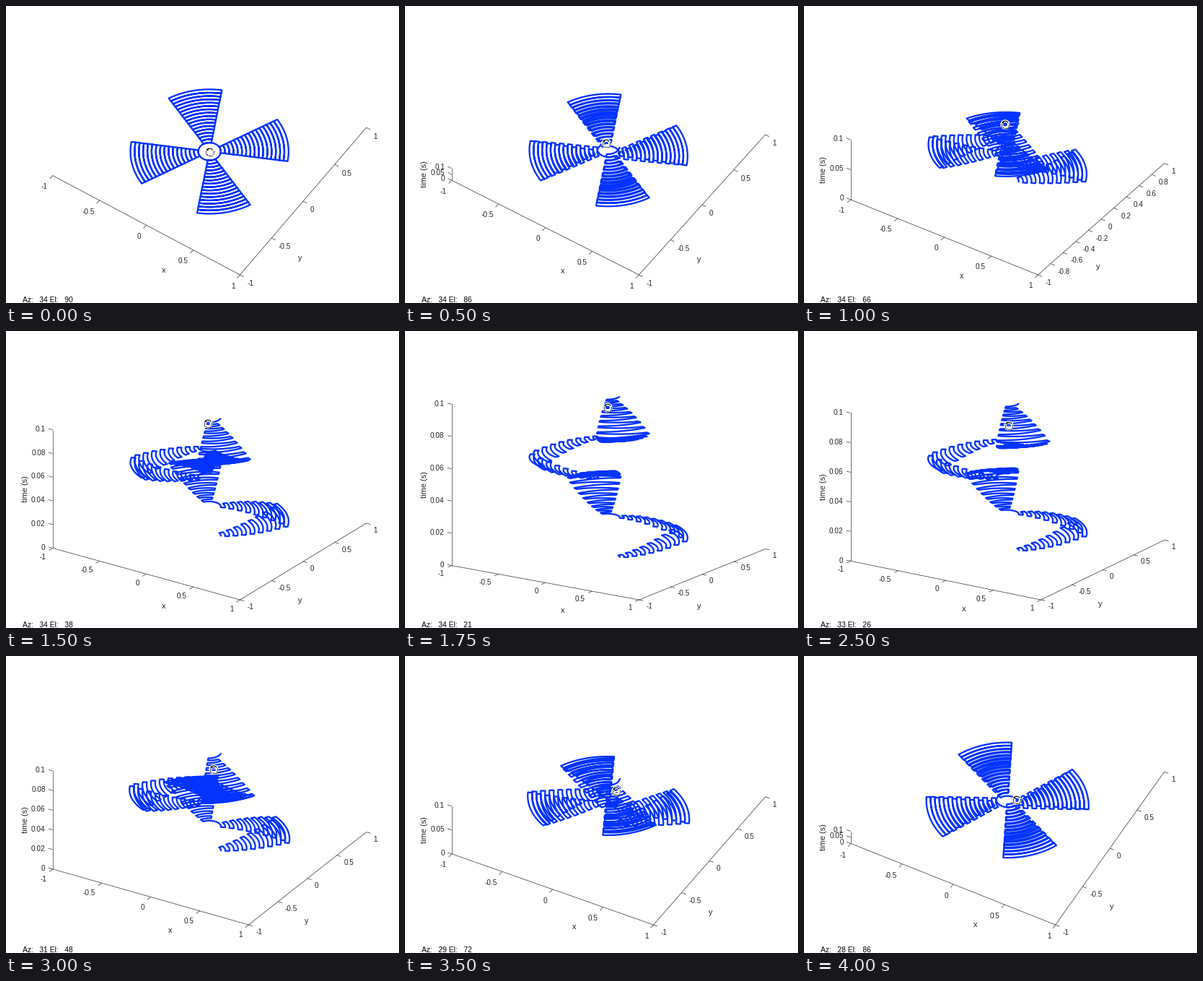
A matplotlib script that plays this animation: 545x411 px, repeating every 4.1 s.

```python
import numpy as np
import matplotlib.pyplot as plt
from matplotlib.animation import FuncAnimation

W, H, DPI = 545, 411, 100
PX = 72 / DPI
LEFT, RIGHT, BOTTOM, HEIGHT = 64.7, 499.7, 372, 341.2
BLUE, INK = "#0433ff", "#262626"
STEP, TICK = 250, 50
LOOP = 4100

# azimuth, elevation, pointer x, pointer y; one view per 250 ms
VIEWS = [
    (34, 90, 282.5, 202), (34, 90, 279, 199), (34, 86, 279, 190),
    (34, 78, 279, 180), (34, 66, 279, 164), (34, 50.5, 280, 144),
    (34, 38, 280, 128), (34, 20.8, 281, 106), (34, 10.5, 281, 93),
    (34, 11.4, 282, 111), (33, 25.7, 284, 131), (32, 38.6, 286, 144),
    (31, 47.8, 288, 157), (30, 60, 290, 172), (29, 72, 293, 187),
    (28.4, 81.5, 294, 195), (28, 86, 295, 199),
]

plt.rcParams["font.family"] = "Liberation Sans"
fig = plt.figure(figsize=(W / DPI, H / DPI), dpi=DPI, facecolor="white")
ax = fig.add_axes([0, 0, 1, 1])
ax.set_xlim(0, W)
ax.set_ylim(H, 0)
ax.axis("off")


def scan_path():
    """Four blades swept back and forth at constant speed over 0.1 s."""
    radii = np.linspace(0.1, 0.7, 17)
    sweep = np.r_[radii, radii[-2:0:-1]]
    r, a = [], []
    for blade in range(4):
        ends = np.radians(np.array([25, 65]) + 90 * blade)
        for k, rad in enumerate(sweep):
            start, stop = ends if k % 2 == 0 else ends[::-1]
            a.append(np.linspace(start, stop, 16))
            r.append(np.full(16, rad))
        a.append(np.linspace(ends[0], ends[0] + np.pi / 2, 20))
        r.append(np.full(20, 0.1))
    r, a = np.concatenate(r), np.concatenate(a)
    x, y = r * np.cos(a), r * np.sin(a)
    dist = np.r_[0, np.cumsum(np.hypot(np.diff(x), np.diff(y)))]
    return x, y, 0.1 * dist / dist[-1]


PATH = scan_path()


def projector(az, el):
    """Orthographic view of the box, stretched to fill the plot area."""
    ca, sa = np.cos(np.radians(az)), np.sin(np.radians(az))
    ce, se = np.cos(np.radians(el)), np.sin(np.radians(el))
    sx = (RIGHT - LEFT) / (ca + sa)
    sy = HEIGHT / (ce + (ca + sa) * se)

    def project(x, y, z):
        u, v, w = (x + 1) / 2, (y + 1) / 2, z / 0.1
        px = LEFT + sx * (u * ca + v * sa)
        py = BOTTOM - sy * (((1 - u) * sa + v * ca) * se + w * ce)
        return np.array([px, py])

    return project


def line(points, color, width, z):
    xs, ys = points
    return ax.plot(xs, ys, color=color, lw=width * PX, zorder=z,
                   solid_joinstyle="round", solid_capstyle="butt")[0]


def label(x, y, s, size=10, ha="center", color=INK, **kw):
    return ax.text(x, y, s, fontsize=size * PX, ha=ha, color=color,
                   va=kw.pop("va", "center_baseline"), zorder=3, **kw)


def segment(p, q):
    return line(np.array([p, q]).T, INK, 0.65, 2)


def number(v):
    return f"{round(v, 2) + 0:g}"


def pointer(cx, cy):
    """Rotate cursor: dotted ring on a white band with an arrow on top."""
    full = np.linspace(0, 2 * np.pi, 60)
    dots = np.radians(np.arange(0, 225, 22.5) - 10)
    top = np.radians(np.linspace(215, 330, 16))

    def ring(a, r):
        return cx + r * np.cos(a), cy + r * np.sin(a)

    out = [line(ring(full, 4.8), "white", 3.8, 5),
           line(ring(top, 4.8), "black", 1.1, 6)]
    out += ax.plot(*ring(dots, 5.4), ls="", marker="o", ms=1.4 * PX,
                   mew=0, color="black", zorder=6)
    out += ax.fill([cx - 5.2, cx - 1.6, cx - 2.2],
                   [cy - 2.8, cy - 5, cy - 1.4],
                   color="black", lw=0, zorder=6)
    return out


def build(az, el, cx, cy):
    project = projector(az, el)
    west, front = project(-1, -1, 0), project(1, -1, 0)
    east, top = project(1, 1, 0), project(-1, -1, 0.1)
    xdir, ydir = front - west, east - front
    drop, rise = xdir[1], -ydir[1]
    xdir, ydir = xdir / np.hypot(*xdir), ydir / np.hypot(*ydir)

    out = [line(project(*PATH), BLUE, 2.3, 4),
           segment(west, front), segment(front, east)]

    for v in np.arange(-1, 1.01, 0.5):
        p = project(v, -1, 0)
        out.append(segment(p, p - 6 * ydir))
        out.append(label(p[0] - 0.5 - 10 * ydir[0], p[1] + 6 - 11.5 * ydir[1],
                         number(v), ha="right"))

    dense = az > 33 and 60 < el < 70
    for v in np.arange(-1, 1.01, 0.2 if dense else 0.5):
        p = project(1, v, 0)
        out.append(segment(p, p + 6 * xdir))
        out.append(label(p[0] + 9.7, p[1] + 6 + 11.5 * xdir[1],
                         number(v), ha="left"))

    if el < 90:
        out.append(segment(west, top))
        tall = west[1] - top[1] > 100
        for v in np.arange(0, 0.101, 0.02 if tall else 0.05):
            p = project(-1, -1, v)
            q = p - 6 * xdir
            out.append(segment(p, q))
            out.append(label(q[0] - 4.2, q[1] - 0.3, number(v), ha="right"))
        out.append(label(26.7, (west[1] + top[1]) / 2, "time (s)", 11,
                         rotation=90, va="center"))

    turn = 34 - az
    mx, my = (west + front) / 2
    out.append(label(mx + 24.5 + turn, my + 25 + 0.265 * drop, "x", 11))
    mx, my = (front + east) / 2
    out.append(label(mx - 4.2 + 1.1 * turn, my + 25 + 0.26 * rise, "y", 11))
    out.append(label(22.7, 409.7, f"Az:   {az:.0f} El:   {el:.0f}", 10.3,
                     ha="left", color="black", va="baseline"))
    return out + pointer(cx, cy)


scenes = [build(*view) for view in VIEWS]


def draw(i):
    now = min(i * TICK // STEP, len(scenes) - 1)
    for k, scene in enumerate(scenes):
        for artist in scene:
            artist.set_visible(k == now)
    return []


anim = FuncAnimation(fig, draw, frames=LOOP // TICK, interval=TICK,
                     repeat=True, repeat_delay=0, blit=False)
plt.show()
```
